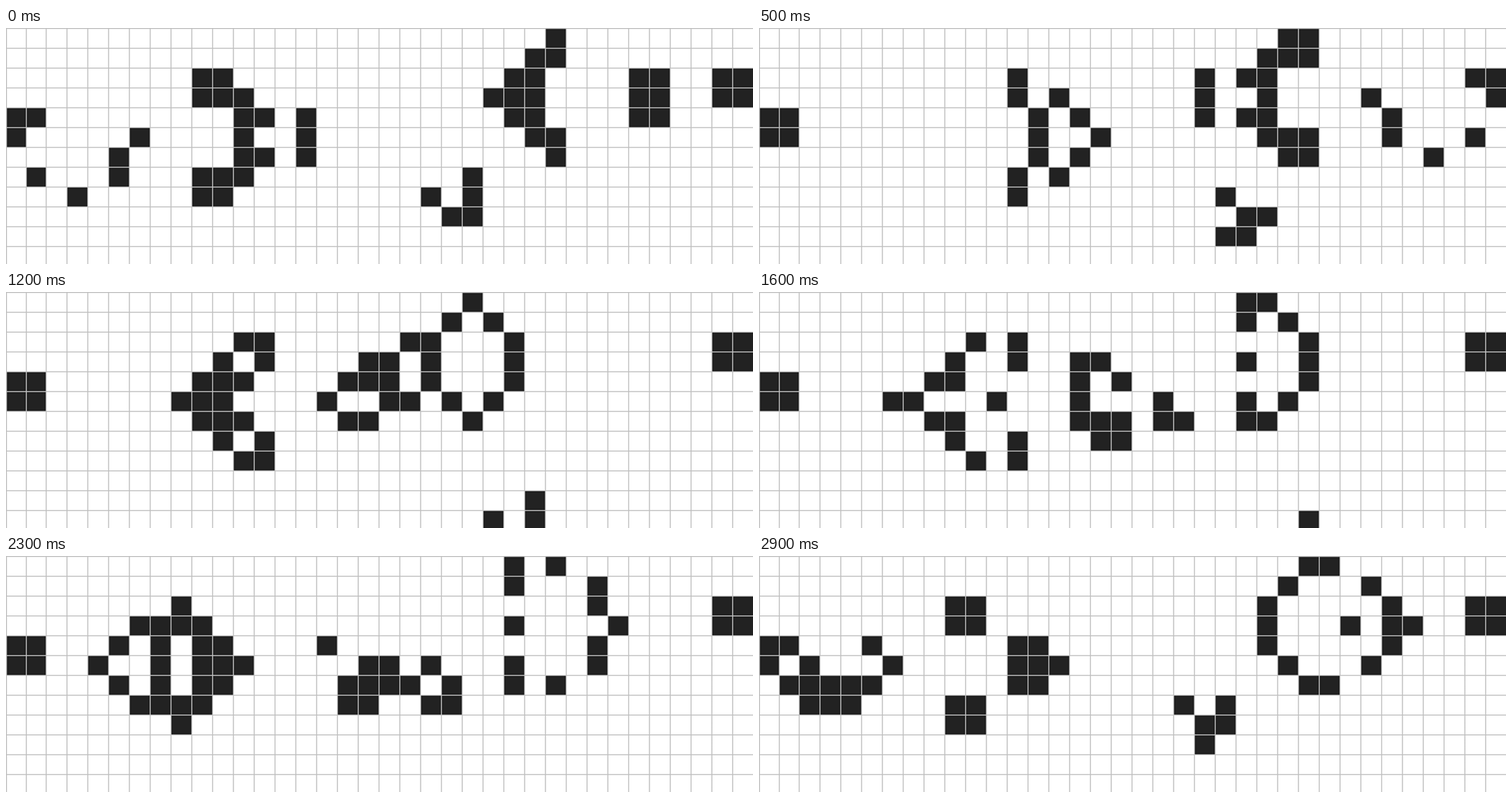
Recreate the animation shown at these times as a matplotlib script. Size 1280x405 px, loop 3000 ms.

```python
import numpy as np
import matplotlib.pyplot as plt
from matplotlib.animation import FuncAnimation

WIDTH, HEIGHT, DPI = 1280, 405, 80
COLS, ROWS, PAD = 36, 12, 12
PERIOD = 30
WARM_UP = 21  # generations from the bare gun until the loop begins
PAPER, LINE, CELL = 255, 192, 34

# The board is laid out at 790 x 250 units with one-unit lines, then scaled to the stage.
UNITS_W, UNITS_H = 790, 250


def column_edge(col):
    return 22 * col - min(col, 2)


def row_edge(row):
    return 21 * row


def glider_gun():
    """Two mirror-symmetric shuttles between two blocks."""
    world = np.zeros((ROWS + 2 * PAD, COLS + 2 * PAD), dtype=int)
    board = world[PAD:, PAD:]

    def mirrored(axis, distance, *cols):
        for row in (axis - distance, axis + distance):
            board[row, list(cols)] = 1

    for d in range(4):
        # rounded ring: a straight-sided back and a curved front
        mirrored(5, d, 10 + max(d - 1, 0), 16 - d * (d - 1) // 2)
        # arrow: a solid head, then two swept tails
        mirrored(3, d, *((20, 21) if d < 2 else (26 - 2 * (4 - d), 24)))
    mirrored(5, 0, 14, 17)
    for col, row in ((0, 4), (34, 2)):
        board[row:row + 2, col:col + 2] = 1
    return world


def step(world):
    neighbours = sum(np.roll(world, (dy, dx), (0, 1))
                     for dy in (-1, 0, 1) for dx in (-1, 0, 1) if dy or dx)
    return ((neighbours == 3) | ((world == 1) & (neighbours == 2))).astype(int)


def run_cycle():
    worlds = [glider_gun()]
    for _ in range(WARM_UP + PERIOD - 1):
        worlds.append(step(worlds[-1]))
    return [w[PAD:PAD + ROWS, PAD:PAD + COLS] for w in worlds[WARM_UP:]]


def render(cells):
    picture = np.full((UNITS_H, UNITS_W), PAPER, dtype=float)
    picture[[row_edge(r) for r in range(ROWS)], :] = LINE
    picture[:, [column_edge(c) for c in range(COLS)]] = LINE
    for row, col in zip(*np.nonzero(cells)):
        picture[row_edge(row) + 1:row_edge(row + 1),
                column_edge(col) + 1:column_edge(col + 1)] = CELL
    return picture


generations = run_cycle()

fig = plt.figure(figsize=(WIDTH / DPI, HEIGHT / DPI), dpi=DPI, facecolor="white")
ax = fig.add_axes([0, 0, 1, 1])
ax.axis("off")
board_image = ax.imshow(render(generations[0]), cmap="gray", vmin=0, vmax=255,
                        aspect="auto", interpolation="catrom")


def update(frame):
    board_image.set_data(render(generations[frame]))
    return [board_image]


animation = FuncAnimation(fig, update, frames=PERIOD, interval=100,
                          repeat=True, repeat_delay=0)
plt.show()
```
